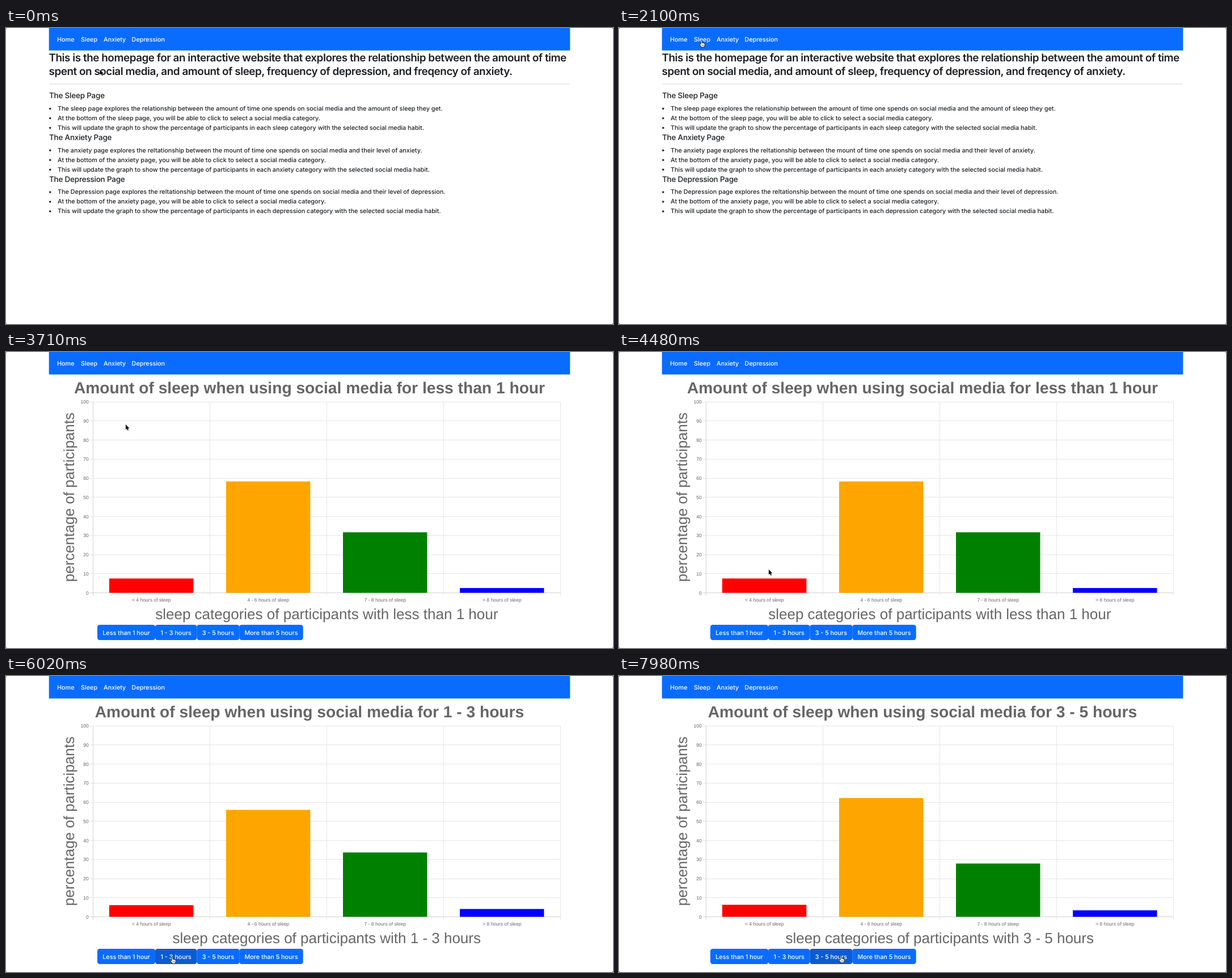
Recreate the animation shown at these times as an HTML page. Size 1070 by 523 pixels, loop 8 s.

```html
<!DOCTYPE html>
<html lang="en">
<head>
<meta charset="utf-8">
<title>Social media and sleep</title>
<style>
  html, body { margin: 0; width: 100%; height: 100%; overflow: hidden; background: #fff; }
  svg { display: block; width: 100%; height: 100%; }
  text { white-space: pre; text-rendering: geometricPrecision; font-optical-sizing: none; }
  .ui { font: 450 10.8px Inter, sans-serif; fill: #1c1f23; }
  .light { fill: #fff; }
  .lead { font-size: 18.9px; font-weight: 590; letter-spacing: -.47px; }
  .sub { font-size: 13.5px; font-weight: 550; letter-spacing: -.22px; }
  .chart { font: 8.6px "Liberation Sans", Arial, sans-serif; fill: #666; }
  .title { font-size: 28.2px; font-weight: bold; }
  .axis { font-size: 26px; }
  .tip { fill: #fff; }
  .bold { font-weight: bold; }
  .mid { text-anchor: middle; }
  .end { text-anchor: end; }
</style>
</head>
<body>
<svg id="stage" viewBox="0 0 1070 523"></svg>
<script>
const LOOP = 8000, STEP = 70;
const BLUE = [10, 108, 255], BLUE_HOVER = [11, 92, 211];
const stage = document.getElementById('stage');

function add(parent, tag, attrs, content) {
  const el = document.createElementNS('http://www.w3.org/2000/svg', tag);
  for (const key in attrs) el.setAttribute(key, attrs[key]);
  if (content !== undefined) el.textContent = content;
  parent.appendChild(el);
  return el;
}
const group = (parent = stage) => add(parent, 'g', {});
const rect = (parent, x, y, width, height, fill, rx = 0) =>
  add(parent, 'rect', { x, y, width, height, fill, rx });
const text = (parent, x, y, cls, content) => add(parent, 'text', { x, y, class: cls }, content);
const line = (parent, x1, y1, x2, y2, stroke) => add(parent, 'line', { x1, y1, x2, y2, stroke });

const clamp = v => Math.max(0, Math.min(1, v));
const ramp = (t, from, to) => clamp((t - from) / (to - from));
const mix = (a, b, k) => a + (b - a) * k;
const easeOut = k => 1 - (1 - k) ** 4;
const blend = (a, b, k) => `rgb(${a.map((v, i) => Math.round(mix(v, b[i], k)))})`;
const show = (el, on) => el.setAttribute('visibility', on ? 'visible' : 'hidden');

// Navigation bar
rect(stage, 75.7, 0, 918.6, 39.7, blend(BLUE, BLUE, 0));
[['Home', 90], ['Sleep', 132], ['Anxiety', 172], ['Depression', 221.6]]
  .forEach(([label, x]) => text(stage, x, 24, 'ui light', label));

// Home page
const home = group();
text(home, 75.5, 58.6, 'ui lead', 'This is the homepage for an interactive website that explores the relationship between the amount of time');
text(home, 75.5, 82.6, 'ui lead', 'spent on social media, and amount of sleep, frequency of depression, and freqency of anxiety.');
rect(home, 76, 98.4, 918, 1, '#d6d7d8');
const sections = [
  ['Sleep', 'sleep', 'The sleep page explores the relationship between the amount of time one spends on social media and the amount of sleep they get.', 'sleep'],
  ['Anxiety', 'anxiety', 'The anxiety page explores the reltationship between the mount of time one spends on social media and their level of anxiety.', 'anxiety'],
  ['Depression', 'anxiety', 'The Depression page explores the reltationship between the mount of time one spends on social media and their level of depression.', 'depression']
];
sections.forEach(([name, page, intro, category], i) => {
  const y = 124.2 + i * 73.8;
  text(home, 76, y, 'ui sub', `The ${name} Page`);
  [
    intro,
    `At the bottom of the ${page} page, you will be able to click to select a social media category.`,
    `This will update the graph to show the percentage of participants in each ${category} category with the selected social media habit.`
  ].forEach((item, j) => {
    const base = y + 21.5 + j * 17;
    add(home, 'circle', { cx: 77.8, cy: base - 3.2, r: 1.75, fill: '#1c1f23' });
    text(home, 91, base, 'ui', item);
  });
});

// Sleep page
const LEFT = 153.2, COL = 206, ZERO = 425.5, UNIT = 3.375;
const sleep = group();
const title = text(sleep, 535, 72.6, 'chart title mid', '');
const xTitle = text(sleep, 565.3, 472.2, 'chart axis mid', '');
const yTitle = text(sleep, 0, 0, 'chart axis mid', 'percentage of participants');
yTitle.setAttribute('transform', 'translate(120.3 256.6) rotate(-90)');

for (let v = 0; v <= 100; v += 10) {
  const y = ZERO - v * UNIT;
  const snap = Math.floor(y) + .5;
  line(sleep, 148, snap, 977, snap, v ? '#e5e5e5' : '#d2d2d2');
  text(sleep, 145.8, y + 3, 'chart end', v);
}
for (let i = 0; i <= 4; i++) {
  const x = Math.floor(LEFT + i * COL) + .5;
  line(sleep, x, 88, x, 430.5, i ? '#e5e5e5' : '#d2d2d2');
}
['< 4', '4 - 6', '7 - 8', '> 8'].forEach((range, i) =>
  text(sleep, 256.2 + i * COL, 441.2, 'chart mid', `${range} hours of sleep`));

const bars = ['#f00', '#ffa500', '#008000', '#00f'].map((fill, i) =>
  rect(sleep, 182 + i * COL, ZERO, 148.4, 0, fill));

const buttons = [
  ['Less than 1 hour', 161, 102.2],
  ['1 - 3 hours', 263, 73.4],
  ['3 - 5 hours', 336.3, 75.2],
  ['More than 5 hours', 411.3, 112.4]
].map(([label, x, w]) => {
  const box = rect(sleep, x, 482, w, 27, '', 4.2);
  text(sleep, x + w / 2, 499.7, 'ui light mid', label);
  return box;
});

const tooltip = group(sleep);
add(tooltip, 'path', {
  d: 'M265.7 384H392a4 4 0 0 1 4 4V412.8a4 4 0 0 1-4 4H265.7a4 4 0 0 1-4-4V404L258 400.4L261.7 397V388a4 4 0 0 1 4-4Z',
  fill: 'rgba(0,0,0,.8)'
});
text(tooltip, 265.2, 396, 'chart tip bold', '< 4 hours of sleep');
rect(tooltip, 265.3, 403, 8.6, 8.6, '#fff');
rect(tooltip, 266.1, 403.8, 7, 7, '#f00');
text(tooltip, 275.4, 410.2, 'chart tip', 'Percentage of participants: 7.5');

const choices = [
  { start: 2870, end: 3010, label: 'less than 1 hour', values: [7.5, 58.3, 31.7, 2.5] },
  { start: 5670, end: 6020, label: '1 - 3 hours', values: [6.1, 56, 33.7, 4.1] },
  { start: 7210, end: 7560, label: '3 - 5 hours', values: [6.3, 62.2, 27.9, 3.4] }
];

// Pointers, hot spot at the origin
const arrow = group();
add(arrow, 'path', {
  d: 'M0 0V9.3L2.1 7.4L3.6 10.8L5.1 10.1L3.7 6.9H6.5Z',
  fill: '#000', stroke: '#fff', 'stroke-width': 1.2, 'paint-order': 'stroke', 'stroke-linejoin': 'round'
});
const hand = group();
add(hand, 'path', {
  d: 'M-1.7 7.2V1.4Q-1.6 .3-.6 .3T.5 1.4V4.6Q.8 3.8 1.6 4T2.4 5Q2.8 4.3 3.5 4.6T4.2 5.6Q5.6 5 5.7 6.6Q5.8 9 4.6 10.6V12H-1V10.8Q-3 9-4.2 6.6Q-4.2 5.3-3 5.6Z',
  fill: '#fff', stroke: '#000', 'stroke-width': .8, 'stroke-linejoin': 'round'
});
add(hand, 'path', { d: 'M.4 7.4V10M2 7.4V10M3.5 7.4V10', stroke: '#000', 'stroke-width': .5 });

const route = [
  [70, 165.5, 73.5], [210, 135, 36], [280, 240, 68], [420, 499, 133],
  [490, 499, 133], [700, 290, 74], [980, 115, 9], [1330, 145.8, 22],
  [3360, 145.8, 22], [3710, 211, 128], [3920, 239.5, 259], [4060, 239.5, 259],
  [4550, 268, 405], [4900, 292, 485], [4970, 294.5, 491], [5180, 293.8, 496.2],
  [6300, 293.8, 496.2], [7140, 358, 496.2], [7770, 358, 496.2], [7980, 391.8, 494.8]
];
function pointerAt(t) {
  const i = route.findIndex(p => p[0] >= t);
  if (i <= 0) return (i ? route[route.length - 1] : route[0]).slice(1);
  const [t0, x0, y0] = route[i - 1], [t1, x1, y1] = route[i];
  const k = ramp(t, t0, t1);
  return [mix(x0, x1, k), mix(y0, y1, k)];
}

function drawChart(t) {
  const n = t >= choices[2].start ? 2 : t >= choices[1].start ? 1 : 0;
  const { start, end, label, values } = choices[n];
  const before = n ? choices[n - 1].values : [0, 0, 0, 0];
  const k = easeOut(ramp(t, start, end));
  title.textContent = `Amount of sleep when using social media for ${label}`;
  xTitle.textContent = `sleep categories of participants with ${label}`;
  bars.forEach((bar, i) => {
    const h = mix(before[i], values[i], k) * UNIT;
    bar.setAttribute('y', ZERO - h);
    bar.setAttribute('height', h);
  });

  const tip = ramp(t, 4480, 4690) * (1 - ramp(t, 4900, 5180));
  tooltip.setAttribute('opacity', tip);
  bars[0].setAttribute('fill', blend([255, 0, 0], [236, 0, 0], tip));

  const swap = ramp(t, 6860, 7070);
  const hover = [0, ramp(t, 4970, 5180) * (1 - swap), swap, 0];
  buttons.forEach((b, i) => b.setAttribute('fill', blend(BLUE, BLUE_HOVER, hover[i])));
}

// Rounded window corners
[[0, 0, 1, 1], [1070, 0, -1, 1], [0, 523, 1, -1], [1070, 523, -1, -1]].forEach(([x, y, sx, sy]) =>
  add(stage, 'path', { d: 'M0 0H2Q0 0 0 2Z', fill: '#333', transform: `translate(${x} ${y}) scale(${sx} ${sy})` }));

function draw(now) {
  const t = Math.floor((now % LOOP) / STEP) * STEP;
  const onSleep = t >= choices[0].start;
  home.setAttribute('display', onSleep ? 'none' : 'inline');
  sleep.setAttribute('display', onSleep ? 'inline' : 'none');
  if (onSleep) drawChart(t);

  const [x, y] = pointerAt(t);
  const pointing = (t >= 1260 && t < 3430) || t >= 4900;
  const place = `translate(${x} ${y})`;
  arrow.setAttribute('transform', place);
  hand.setAttribute('transform', place);
  show(arrow, !pointing);
  show(hand, pointing);
}

const begin = performance.now();
function tick() {
  draw(performance.now() - begin);
  requestAnimationFrame(tick);
}
tick();
</script>
</body>
</html>
```
